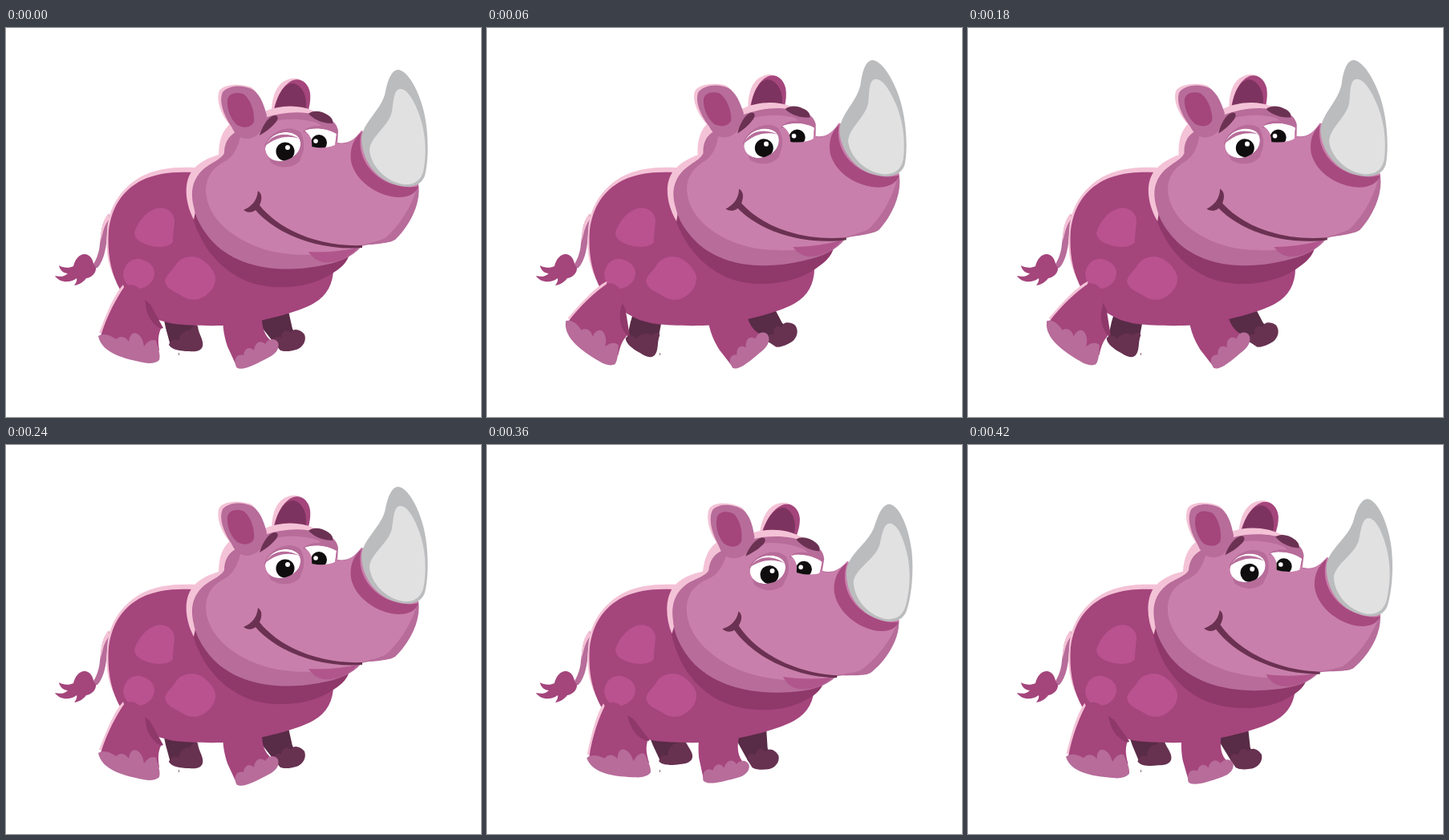
An HTML page that plays this animation: 592 px wide and 485 px high, repeating every 480 ms.

```html
<!DOCTYPE html>
<html lang="en">
<head>
<meta charset="utf-8">
<title>Walking rhino</title>
<style>
  html, body { margin: 0; width: 100%; height: 100%; overflow: hidden; background: #fff; }
  svg { display: block; width: 592px; height: 485px; }
  .rim { fill: #f4c2d6; }
  .body { fill: #a4457c; }
  .spot { fill: #b9528f; }
  .shade { fill: #b76c9a; }
  .skin { fill: #c97fab; }
  .band { fill: #8f386a; }
  .ink { fill: #6b3152; }
  .far { fill: #582b46; }
  .farfoot { fill: #673150; }
</style>
</head>
<body>
<svg viewBox="0 0 592 485">
  <defs>
    <clipPath id="eyeL"><path id="whiteL" d="M323 151C324 138 337 129 351 130C362 131 368 137 367 146C366 158 353 166 341 166C331 166 324 160 323 151Z"/></clipPath>
    <clipPath id="eyeR"><path id="whiteR" d="M372 128C382 123 402 125 412 132L410 146C402 150 390 150 381 148C382 140 379 133 372 128Z"/></clipPath>
  </defs>

  <g id="tail">
    <path class="shade" d="M129 232C119 240 119 254 117 269C116 283 111 291 106 300L114 299C123 289 125 272 126 258Z"/>
    <path class="rim" d="M128 231C119 240 119 255 117 268C121 257 121 247 129 238Z"/>
    <path class="body" d="M99 282C92 281 86 288 84 297C78 300 71 299 66 296C67 302 72 306 77 306C72 311 66 310 61 309C66 317 79 319 88 312C89 315 87 318 85 321C92 320 97 316 100 312C107 311 113 305 112 298C108 297 110 284 99 282Z"/>
  </g>

  <g id="farRear">
    <path class="far" d="M192 340L199 374L205 396L244 396L238 372L228 340Z"/>
    <path class="farfoot" d="M203 395C205 389 210 387 215 390C217 381 223 376 229 377C233 371 237 369 239 372C240 382 247 389 245 397C243 403 236 404 228 403C217 403 206 401 203 395Z"/>
  </g>
  <g id="farFront">
    <path class="far" d="M320 335L310 362L335 394L346 403L368 393L357 375L350 344L342 325Z"/>
    <path class="farfoot" d="M334 393C333 387 338 383 343 386C344 377 350 375 355 380C358 374 366 375 372 382C375 390 370 398 362 401C355 403 348 404 342 402Z"/>
  </g>

  <path class="rim" d="M144 326C130 306 123 285 126 254C127 225 142 201 167 186C188 175 209 173 236 174L236 190L160 225L150 320Z"/>
  <path class="body" d="M142 326C130 304 126 280 128 252C132 222 146 202 169 190C188 181 207 179 232 180L300 215L408 300C408 318 400 334 384 343C364 355 325 363 302 368C274 373 231 371 211 369C183 365 166 353 142 326Z"/>
  <path class="spot" d="M160 255C164 242 174 229 187 225C199 222 211 230 210 242C209 251 208 260 208 267C202 274 189 274 178 271C168 268 160 263 160 255Z"/>
  <path class="spot" d="M146 307C147 295 156 286 167 288C177 290 186 297 185 307C184 316 176 324 166 325C155 326 147 319 146 307Z"/>
  <path class="spot" d="M198 315C200 307 207 303 211 296C216 287 228 283 238 286C249 290 258 299 261 310C262 322 254 332 243 337C233 341 224 338 216 332C208 328 199 324 198 315Z"/>

  <g id="nearRear">
    <path class="band" d="M163 330C160 350 167 361 180 371C187 375 192 376 196 374L180 345Z"/>
    <path class="rim" d="M146 320C135 332 126 354 116 380L124 382L150 332Z"/>
    <path class="body" d="M148 322C138 336 126 358 118 384L150 402L191 402C189 388 190 382 193 375C182 369 175 358 174 344C173 327 161 316 148 322Z"/>
    <path class="shade" d="M115 384C121 380 129 382 137 388C142 383 149 384 153 391C154 381 160 377 166 383C170 387 171 391 172 397C176 391 182 387 187 390C189 397 193 407 191 414C187 418 179 419 171 417C150 413 119 406 115 384Z"/>
  </g>
  <g id="nearFront">
    <path class="body" d="M273 345C268 365 271 382 276 397L287 421L332 391C323 385 318 374 319 355C318 336 290 326 273 345Z"/>
    <path class="shade" d="M286 419C284 411 289 406 296 408C297 400 303 396 309 402C310 392 317 388 323 394C327 387 335 386 339 392C342 401 334 408 325 412C313 418 294 429 287 423Z"/>
  </g>

  <g id="head">
    <path class="band" d="M227 206C232 256 257 298 301 316C336 329 381 323 405 307C417 300 424 293 427 285L300 240Z"/>
    <path class="rim" d="M331 102C332 84 338 68 352 64C364 60 375 67 378 79L376 104Z"/>
    <path class="body" d="M334 101C338 86 345 70 358 65C368 62 377 69 379 81C380 91 378 98 376 106Z"/>
    <path d="M335 101C337 87 345 70 357 69C369 70 377 86 373 105Z" fill="#7d335f"/>
    <path class="rim" d="M234 239C223 218 221 193 232 178C242 166 255 161 265 158C265 140 270 127 280 119L322 104C341 96 365 95 385 104L390 125L300 140L245 185Z"/>
    <path class="shade" d="M234 223C229 203 233 188 246 176C257 167 268 164 272 156C272 144 277 134 288 129L322 112C345 104 371 103 389 109C404 112 412 117 414 128L413 143C427 145 435 139 443 128L460 137L514 195C515 218 502 248 481 266C467 269 453 269 443 272C432 286 413 293 389 297C333 307 280 296 252 260C242 247 236 235 234 223Z"/>
    <path class="skin" d="M249 201C250 184 258 174 275 165C286 158 290 144 292 136L324 119C350 110 377 114 389 119L411 137L413 144C427 146 434 139 443 128L460 137L514 195C507 219 495 243 480 258C468 266 454 267 443 271C417 283 374 285 347 281C300 276 249 244 249 201Z"/>
    <path class="shade" d="M470 264C492 246 506 221 514 195C518 220 501 249 485 264C477 268 460 270 449 270Z"/>

    <path class="rim" d="M280 122C268 109 261 89 266 78C272 69 294 69 306 74L312 80L285 120Z"/>
    <path class="shade" d="M281 123C271 108 265 91 270 80C277 71 296 70 308 77C318 84 322 98 325 109C323 125 315 137 301 138C291 138 285 132 281 123Z"/>
    <path class="body" d="M276 90C277 81 288 79 297 83C306 91 310 106 309 117C305 125 296 125 288 121C280 114 275 101 276 90Z"/>

    <path class="shade" d="M322 147C329 128 354 119 367 130C372 139 373 151 368 160L366 166C358 174 344 177 330 168Z"/>
    <path class="shade" d="M370 130C376 120 399 119 413 130L410 134L372 130Z"/>
    <g clip-path="url(#eyeL)">
      <use href="#whiteL" fill="#fff"/>
      <circle cx="348" cy="154" r="11.5" fill="#100d0f"/>
      <circle cx="351" cy="149" r="3" fill="#fff"/>
    </g>
    <g clip-path="url(#eyeR)">
      <use href="#whiteR" fill="#fff"/>
      <circle cx="390" cy="143" r="10" fill="#100d0f"/>
      <circle cx="386" cy="141" r="2.8" fill="#fff"/>
    </g>
    <path class="shade" d="M323 147C330 133 347 128 366 138C349 133 336 137 323 147Z"/>
    <path class="ink" d="M316 134C319 124 325 112 334 109C340 108 340 114 335 119C330 125 323 130 316 134Z"/>
    <path class="ink" d="M377 107C383 102 393 103 402 109C406 112 408 115 407 119C397 119 386 116 377 107Z"/>

    <path class="body" d="M443 130C436 158 453 184 480 194C491 198 503 200 514 197C511 207 501 211 488 211C461 209 435 190 430 166C428 151 433 138 443 130Z" fill-opacity=".9"/>
    <path d="M489 52C481 52 476 64 473 79C469 102 444 117 443 139C444 166 462 190 488 196C502 200 517 198 522 184C527 165 527 131 521 105C515 80 502 54 489 52Z" fill="#bbbcbe"/>
    <path d="M491 76C483 77 483 92 481 104C477 123 455 134 453 152C455 173 474 192 496 195C511 196 519 188 521 174C524 154 523 134 517 114C511 95 501 75 491 76Z" fill="#e1e1e2"/>

    <path d="M377 279C399 280 421 278 438 274C429 286 411 294 395 292C386 290 381 285 377 279Z" fill="#b1568d"/>
    <path class="ink" d="M296 227C305 223 313 216 314 203C320 207 319 214 316 221C340 251 388 273 444 271L444 274C389 278 337 257 311 227C306 231 300 230 296 227Z"/>
  </g>
  <rect x="215" y="405" width="1" height="3" fill="#8b6b7d"/>
</svg>
<script>
const STEP = 60;
// Pivot, then degrees for five poses from head high to head low.
const parts = {
  head: [270, 200, [-5, -3.2, 0, 3.9, 5.5]],
  nearRear: [160, 327, [34, 20, 0, -6.7, -8.8]],
  nearFront: [300, 340, [-19, -13, 0, 8.8, 12.5]],
  farRear: [205, 330, [41, 28, 0, -7.5, -10]],
  farFront: [335, 330, [-22, -15, 0, 6.5, 9]]
};
const cycle = [2, 1, 0, 1, 2, 3, 4, 3];

function draw(ms) {
  const pose = cycle[Math.floor(ms / STEP) % cycle.length];
  for (const [id, [x, y, turns]] of Object.entries(parts)) {
    document.getElementById(id).setAttribute("transform", `rotate(${turns[pose]} ${x} ${y})`);
  }
}

const start = performance.now();
function tick() {
  draw(performance.now() - start);
  requestAnimationFrame(tick);
}
tick();
</script>
</body>
</html>
```
